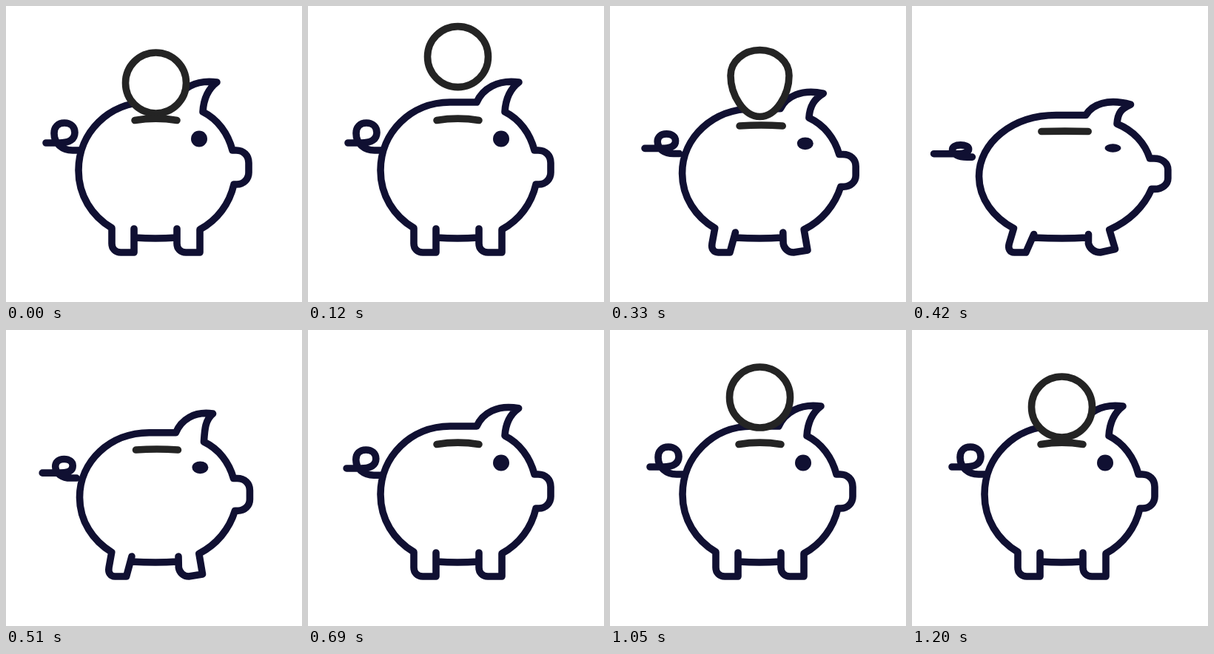
Write an HTML page that moves like this. It is 400 px wide and 400 px high and loops after 1760 ms.

```html
<!DOCTYPE html>
<html lang="en">
<head>
<meta charset="utf-8">
<title>Piggy bank</title>
<style>
  html, body { margin: 0; width: 100%; height: 100%; overflow: hidden; background: #fff; }
  svg { display: block; width: 100vw; height: 100vh; }
  path { fill: none; stroke: #101032; stroke-width: 9.6; stroke-linecap: round; stroke-linejoin: round; }
  #coin { fill: #fff; }
  #coin, #slot { stroke: #242424; }
  #eye { fill: #101032; }
</style>
</head>
<body>
<svg viewBox="0 0 400 400">
  <clipPath id="above"><rect id="mask" width="400" height="400"/></clipPath>
  <path id="tail"/>
  <path id="body"/>
  <ellipse id="eye"/>
  <g clip-path="url(#above)"><path id="coin"/></g>
  <path id="slot"/>
</svg>
<script>
const LOOP = 1760, ACTIVE = 1200, STEP = 30;
const $ = id => document.getElementById(id);

// Eased value at time t from [time, value] keys.
function track(t, ...keys) {
  const i = keys.findIndex(k => k[0] > t);
  if (i < 0) return keys[keys.length - 1][1];
  if (i === 0) return keys[0][1];
  const [t0, a] = keys[i - 1], [t1, b] = keys[i];
  const u = (t - t0) / (t1 - t0);
  return a + (b - a) * u * u * (3 - 2 * u);
}

// Passes every coordinate pair of a path through a warp.
const warpPath = (d, warp) => d.replace(/([\d.]+),([\d.]+)/g,
  (_, x, y) => warp(+x, +y).map(n => n.toFixed(2)).join());

function drawPig(t) {
  const squash = track(t, [240, 0], [420, 2], [600, 0]);
  const lag = track(t, [240, 0], [420, 2], [580, .5], [810, 0]);
  const droop = track(t, [240, 0], [420, 10], [510, 0], [660, 3], [840, 0]);
  const lean = track(t, [360, 0], [510, 7], [720, 0]);
  const width = track(t, [310, 1], [330, 1], [410, 1.07], [510, .98], [540, .97], [640, 1]);
  const bend = Math.min(squash, 1.5);
  const widen = x => 195 + (x - 195) * width;

  const bodyWarp = (x, y) => {
    let dx = 0, dy = Math.max(0, 305 - y) * .05 * squash;
    if (y < 300) dx = (x - 120) * .02 * squash * Math.min(1, (302 - y) / 60);
    else if (x < 200) dx = (y - 293) / 40 * bend * (85 - x) / 8;
    else dx = (y - 301) / 32 * bend * 5;
    if (y < 125) {
      const along = (x - 228) / 57;
      dx -= lean * along;
      dy += droop * along;
    }
    if (x > 260 && y > 330) dy -= 3 * bend;
    return [widen(x + dx), y + dy];
  };
  const tailWarp = (x, y) => [
    widen(x - lag * (x < 60 ? 7 : 2.5 + (x - 78) * .13)),
    172 + 11 * lag + (y - 172) * Math.max(.4, 1 - .28 * lag)
  ];

  const knee = 301 + 5 * bend, inR = 231 + 2 * bend;
  $('body').setAttribute('d', warpPath(
    `M173,${knee} L173,333 L155,333 C148,333 143,328 143,321 L143,300
     C116,284 98,256 98,222 C98,171 139,130 192,130 L228,130
     C236,112 256,99 285,103 C273,112 267,126 266,143
     C286,153 300,172 306,195 L311,195 C321,195 328,202 328,212
     L328,225 C328,234 321,241 312,241 L308,241
     C302,267 286,289 262,302 L262,333 L243,333
     C236,333 231,328 231,321 L${inR},${knee}
     M174,313 Q202,315 230,313`, bodyWarp));
  $('tail').setAttribute('d', warpPath(
    `M54,185 L72,185 C86,185 93,180 93,171 C93,163 87,158 79,158
     C70,158 65,164 65,172 C65,186 76,195 90,195 L99,195`, tailWarp));

  const [ex, ey] = bodyWarp(261, 179.5);
  const eye = { cx: ex, cy: ey, rx: 11, ry: 11 * (1 - .24 * squash) };
  for (const name in eye) $('eye').setAttribute(name, eye[name]);

  const sag = bend * 2.5;
  $('slot').setAttribute('d', warpPath(`M174,154.5 Q202.5,${149.7 + sag} 231,154.5`, bodyWarp));
  return bodyWarp(202, 154)[1];
}

function drawCoin(t, slotY) {
  const hop = track(t, [0, 0], [130, 36], [150, 36], [330, -1], [390, -120], [780, -120],
    [781, 0], [930, 0], [1020, 18], [1080, 8], [1200, 0]);
  const egg = track(t, [180, 0], [330, 1], [390, 2], [780, 2], [781, 0]);
  const size = track(t, [780, 1], [781, 0], [930, .96], [960, 1]);
  const x = 202.5, y = 145 - 41 * size - hop;
  const a = (41 - 1.5 * egg) * size, k = .5523;
  const top = y - 41 * size - 4.5 * egg, belly = y - 11 * egg, bottom = y + 41 * size + 3.5 * egg;
  const up = (belly - top) * k, down = (bottom - belly) * (k - .09 * egg);
  $('coin').setAttribute('d',
    `M${x},${top} C${x + a * k},${top} ${x + a},${belly - up} ${x + a},${belly}
     C${x + a},${belly + down} ${x + a * k},${bottom} ${x},${bottom}
     C${x - a * k},${bottom} ${x - a},${belly + down} ${x - a},${belly}
     C${x - a},${belly - up} ${x - a * k},${top} ${x},${top}Z`);
  $('coin').style.display = size < .05 || (t >= 390 && t < 781) ? 'none' : '';
  $('mask').setAttribute('height', slotY);
}

function draw(now) {
  const t = Math.min(ACTIVE, Math.floor(now % LOOP / STEP) * STEP);
  drawCoin(t, drawPig(t));
  requestAnimationFrame(() => draw(performance.now() - start));
}
const start = performance.now();
draw(0);
</script>
</body>
</html>
```
